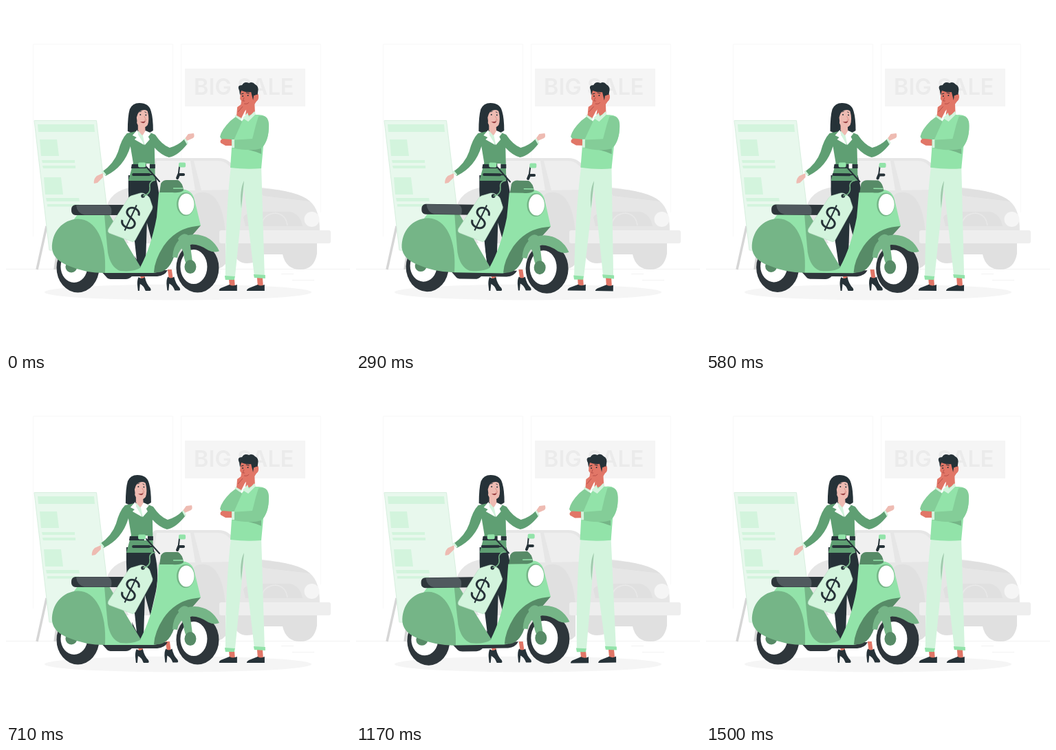
Write an HTML page that moves like this. It is 500 px wide and 500 px high and loops after 1540 ms.

```html
<!DOCTYPE html>
<html lang="en">
<head>
<meta charset="utf-8">
<title>Scooter sale</title>
<style>
  html, body { margin: 0; width: 100%; height: 100%; overflow: hidden; background: #fff; }
  svg { display: block; width: 100%; height: 100%; }
  .dark { fill: #263238; }
  .tyre { fill: #2e363b; }
  .green { fill: #92e3a9; }
  .mid { fill: #75b587; }
  .deep { fill: #5f9f73; }
  .shade { fill: #578b67; }
  .sleeve { fill: #84cd98; }
  .mint { fill: #d3f4dd; }
  .fair { fill: #eebbb2; }
  .tan { fill: #e17667; }
  .white { fill: #fff; }
  .line { fill: none; stroke: #263238; stroke-linecap: round; stroke-linejoin: round; }
</style>
</head>
<body>
<svg viewBox="0 0 500 500">
  <!-- showroom -->
  <path d="M39.500 335V55.500H242.500V382M254.500 382V55.500H457.500V300" fill="none" stroke="#f8f8f8"/>
  <path d="M0 382.500H500M400 389.500H418M416 398.500H448" stroke="#f2f2f2"/>
  <path d="M260 91H435V146H260Z" fill="#f5f5f5"/>
  <text x="273" y="129" font-family="Inter, sans-serif" font-size="32.500" font-weight="600" fill="#ebebeb">BIG SALE</text>

  <!-- car -->
  <g fill="#e0e0e0">
    <path d="M325 340H452V360Q448 383 428 383Q407 383 402 361H372Q366 374 350 374Q336 374 330 358Z"/>
    <path fill="#e6e6e6" d="M145 345V298Q149 268 185 263L206 262L213 226Q214 221 220 221H308Q318 221 324 226L371 264Q425 269 442 284Q456 296 456 326V345Z"/>
    <path fill="#f0f0f0" d="M219 225H268L275 268H212Z"/>
    <path fill="#eee" d="M273 225H308Q316 225 322 230L364 266L284 268Z"/>
    <path d="M249 382Q246 300 277 272Q313 262 319 330V375Q312 383 300 383Z"/>
    <path d="M366 265Q424 268 442 284L374 276Z"/>
    <path d="M345 307Q349 298 380 299H412Q427 301 431 320H348Z"/>
    <path d="M371 319Q374 302 392 301Q407 303 409 319" fill="none" stroke="#e8e8e8" stroke-width="1.500"/>
    <circle cx="444.500" cy="310" r="11" fill="#f5f5f5"/>
    <rect x="310" y="326" width="162" height="19" rx="3" fill="#eee"/>
  </g>

  <!-- price board -->
  <path d="M59 320L45 383M76 350L71 383" stroke="#d6d6d6" stroke-width="3.500"/>
  <path d="M41 166.500H131.500L154 355H63Z" fill="#e8f8ed" stroke="#d8efdf"/>
  <path class="mint" d="M46 172H128L129 183H47ZM49 194H74L77 218H51ZM52 224H100V228H53ZM53 232H101V236H54ZM55 249H80L83 274H57ZM58 279H106L107 284H59ZM60 288H106V291.500H60Z"/>

  <ellipse cx="250" cy="416" rx="194" ry="11.500" fill="#f5f5f5"/>

  <g id="woman">
    <path class="tan" d="M235 383H241L243 397H237ZM195 385H202V399H196Z"/>
    <g class="dark">
      <path id="shoe" d="M191 404Q191 397 193 394Q197 398 202 394Q204 404 210 410Q212 414 209 414H203Q200 406 195 404L194 414H192Z"/>
      <use href="#shoe" x="42.500" y="-.5"/>
      <path d="M178 246H217Q227 280 221 310L213 345L205 315L203 380H190L184 340Q177 290 178 246Z"/>
    </g>
    <path class="fair" d="M141 243L132 247Q127 252 128 258L133 257L141 249ZM260 193L265 186L273 185Q275 190 272 192L263 196Z"/>
    <path class="dark" d="M177 182Q177 160 180 150Q184 141 194 141Q208 141 211 153Q214 163 214 181Q205 188 192 183Q183 186 177 182Z"/>
    <path class="deep" d="M176 185L190 182H205L217 187Q227 202 238 206Q250 203 260 193L264 200Q250 218 237 220Q226 217 216 206L217 254H178L185 228L181 204Q172 234 145 247L140 241Q157 229 163 212Q168 193 176 185Z"/>
    <path class="mint" d="M191 182H204L202 202L195 195Z"/>
    <path class="fair" d="M192 172H202L203 184L198 188L192 181Z"/>
    <path class="white" d="M191 180L184 188L190 191L187 194L201 202L193 188ZM203 181L211 185L207 190L209 194L202 202L199 188Z"/>
    <path class="mint" d="M139 241L144 247L146 245L141 239ZM259 194L263 201L265 199L261 192Z"/>
    <path class="fair" d="M190 151Q199 146 206 153Q209 165 206 173Q200 180 193 175L188 166Z"/>
    <path class="dark" d="M206 152Q193 148 190 162Q192 171 187 180Q181 160 190 145L203 144Z"/>
    <path d="M201 160L204 166H201" fill="none" stroke="#d8897f" stroke-width=".8"/>
    <path class="line" d="M194 154L197 153M202 154L204 155" stroke-width=".8"/>
    <g class="dark"><circle cx="195.500" cy="158" r="1"/><circle cx="203.500" cy="158.500" r="1"/></g>
    <path d="M195 168Q199 169 203 167Q201 173 195 168Z" fill="#983e40"/>
    <path class="dark" d="M183 230H217V236H182Z"/>
    <path class="white" d="M204 229H209V236H204Z"/>
  </g>

  <g id="scooter">
    <g class="tyre">
      <ellipse cx="104.500" cy="380.500" rx="31" ry="36"/>
      <ellipse cx="278.500" cy="380.500" rx="31" ry="36"/>
      <path d="M137 384L147 395Q149 397 154 397H174Q179 397 183 393H220Q231 392 235 384Z"/>
    </g>
    <ellipse class="white" cx="99" cy="379" rx="19.500" ry="23"/>
    <ellipse class="white" cx="273" cy="379" rx="19.500" ry="25"/>
    <circle class="shade" cx="95" cy="379" r="8.500"/>
    <path class="green" d="M98 311L104 303H145Q153 330 158 372Q162 381 195 380Q211 350 219 307L222 271L255 266Q271 267 274 282L283 319Q262 325 247 342Q235 358 228 381Q224 387 214 388H144Z"/>
    <path class="mid" d="M143 303H150L196 380Q187 387 166 385Q152 380 148 358Q145 330 143 303Z"/>
    <path class="white" d="M174 336L187 342L190 369Z"/>
    <path class="mid" d="M67 353C66 329 82 310 105 309.500C130 310 147 340 144 388Q115 388 92 378Q69 370 67 353Z"/>
    <path class="shade" d="M283 319L270 321Q245 326 229 349Q216 369 215 387Q235 390 244 365Q249 348 270 334Z"/>
    <path class="mid" d="M242 365Q244 333 274 332Q299 333 310 356Q302 359 294 355Q279 344 264 347Q251 352 249 366Z"/>
    <path class="mid" d="M250 338Q258 327 266 334L271 371L265 379Q259 372 258 359Z"/>
    <ellipse class="shade" cx="268" cy="379" rx="8.500" ry="10"/>

    <rect class="tyre" x="95" y="289" width="83" height="15" rx="6"/>
    <path d="M102 289.500H149Q155 292 153 303.500H114Q103 301 102 289.500Z" fill="#50595e"/>

    <path class="line" d="M204 234L223 255M186 245H212M250 250L252 233" stroke-width="2"/>
    <path class="line" d="M185 245H208M249 250L251 245H258" stroke-width="4"/>
    <rect class="green" x="192" y="227.500" width="11" height="7" rx="2"/>
    <rect class="green" x="251" y="227.500" width="10" height="7" rx="2"/>
    <path class="shade" d="M223 271L225 258Q228 252 236 253L250 253Q257 257 258 268Q253 272 242 271Z"/>
    <path d="M243 265H257" stroke="#92e3a9" stroke-width="1.500"/>
    <ellipse class="mid" cx="261" cy="288" rx="13" ry="17"/>
    <ellipse class="white" cx="262" cy="288" rx="11.500" ry="15.500"/>

    <path class="mint" stroke="#b9dfc5" stroke-width=".6" d="M178 279Q180 276 185 275L195 272Q199 271 203 274L206 276Q209 278 210 283L213 292Q213 295 211 298L188 340Q186 344 182 342L150 330Q147 328 149 324Z"/>
    <text transform="translate(181 308) rotate(25)" y="16" text-anchor="middle" font-family="Inter, sans-serif" font-size="44" font-weight="300" class="dark">$</text>
    <circle class="dark" cx="199" cy="276" r="2.800"/>
    <path d="M199 276Q210 274 209 264Q207 255 217 253" fill="none" stroke="#75b587" stroke-width="1.500"/>
  </g>

  <g id="man">
    <path class="tan" d="M324 395H332L333 407H325ZM365 394H373L374 407H366Z"/>
    <path class="dark" d="M336 405V414H310Q309 411 315 409L325 405Q330 408 336 405ZM376 405V414H350Q350 411 356 409L366 405Q371 408 376 405Z"/>
    <path class="mint" d="M327 232H371L376 392H361L346 264L333 394H319Q319 300 327 232Z"/>
    <path d="M346 254L342 294Q339 268 346 254Z" fill="#9fc9ac"/>
    <path class="green" d="M318 392L333 393L332 398H319ZM360 390L377 391V396L361 395Z"/>
    <path class="tan" d="M350 142L361 138L362 159L353 164L348 158Z"/>
    <path class="green" d="M343 167Q350 156 365 158Q379 157 381 168Q384 190 374 204L371 236Q349 238 326 235L328 205L330 187Z"/>
    <path class="sleeve" d="M335 160L343 168L331 195Q314 199 311 190Q313 180 326 167Z"/>
    <path d="M334 207Q352 207 371 215L371 207Z" fill="#75b587"/>
    <path class="sleeve" d="M367 160Q382 157 382 174Q382 196 371 207Q355 212 328 206L327 195L358 193L363 173Z"/>
    <path class="mint" d="M351 155L344 163L352 168L363 157L361 153L353 161ZM332 160L340 166L343 163L336 157ZM328 194H332V206H328Z"/>
    <path class="tan" d="M328 194L315 193Q310 195 312 199L319 203H328ZM341 122Q351 117 362 125Q370 128 365 137L361 143Q356 151 348 149L341 145L342 138L340 135Z"/>
    <path class="tan" d="M335 159L336 147L343 142Q347 145 351 144L352 147L347 153L342 163Z"/>
    <path class="dark" d="M340 130L339 123Q335 115 343 115Q346 109 353 112Q358 109 362 114Q368 117 366 125L365 131L360 130L359 137L356 125Q349 126 342 123Z"/>
    <path class="tan" d="M360 131Q366 126 367 132Q367 139 361 139Z"/>
    <g class="dark"><circle cx="344" cy="131" r="1"/><circle cx="351.500" cy="130" r="1"/></g>
    <path class="line" d="M342 128L345 127M349 126L353 127" stroke-width="1"/>
    <path d="M346 133L344 138H347M346 142Q351 143 353 140M344 146L337 154" fill="none" stroke="#a63f3c" stroke-width=".7"/>
  </g>
</svg>
<script>
  const LOOP = 1540, CYCLE = 36, STEP = 1500 / CYCLE;
  const SWAY = [[0, 0], [.25, 1], [.75, -1], [1, 0]];
  const SHAKE = [0, -1, 2, -4, 4, -4, 4, -4, 2, -1, 0].map((x, i) => [i / 10, x]);
  const [woman, scooter, man] = ["woman", "scooter", "man"].map(id => document.getElementById(id));

  // Linear interpolation through [phase, value] keys.
  function valueAt(keys, p) {
    const i = keys.findIndex(key => key[0] > p);
    const [p0, v0] = keys[i - 1], [p1, v1] = keys[i];
    return v0 + (v1 - v0) * (p - p0) / (p1 - p0);
  }

  function draw(now) {
    const tick = Math.min(CYCLE, Math.floor((now % LOOP + 5) / STEP));
    const phase = (tick / CYCLE + 1 / 60) % 1;
    const angle = valueAt(SWAY, phase);
    woman.setAttribute("transform", `translate(${valueAt(SHAKE, phase)} 0)`);
    scooter.setAttribute("transform", `rotate(${angle} 188 322)`);
    man.setAttribute("transform", `rotate(${angle} 346 263)`);
  }

  const start = performance.now();
  function loop() {
    draw(performance.now() - start);
    requestAnimationFrame(loop);
  }
  loop();
</script>
</body>
</html>
```
